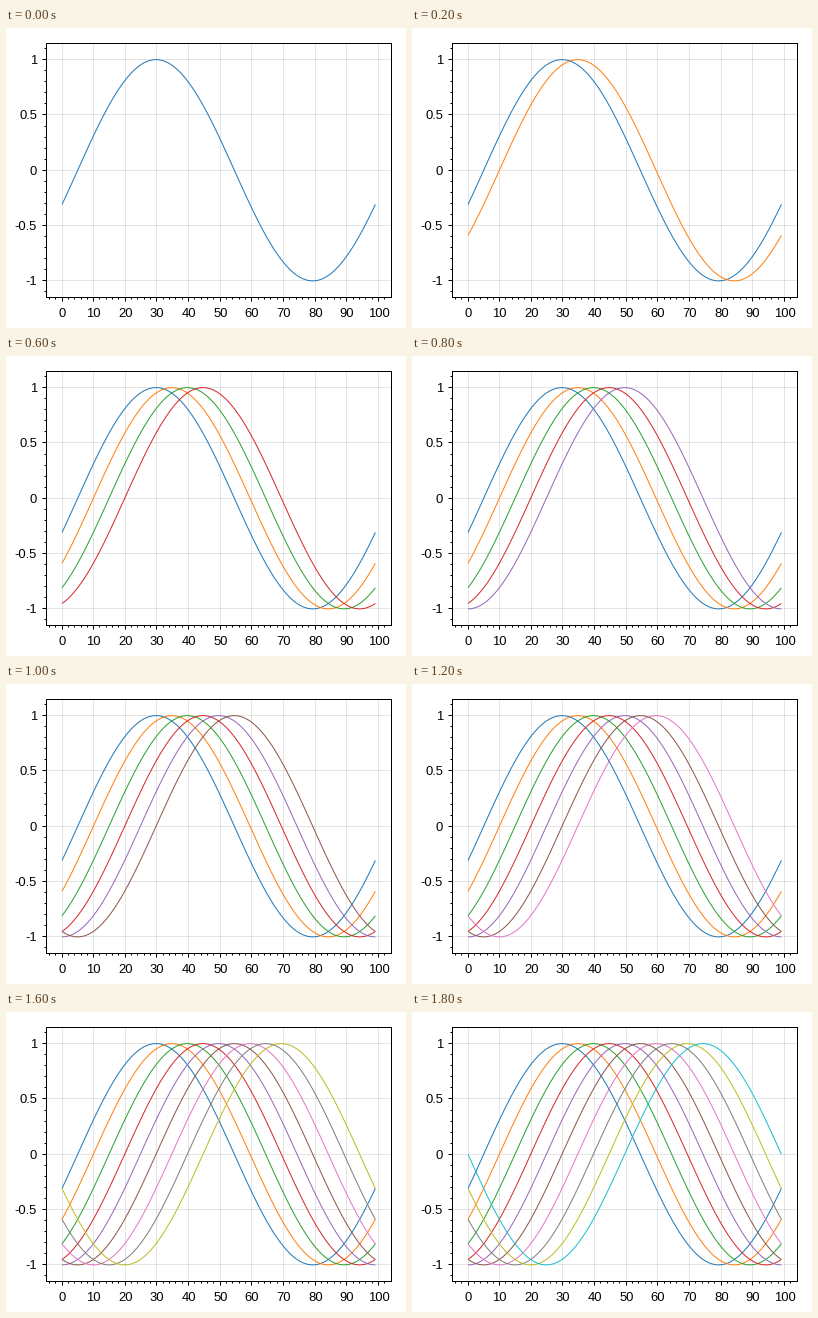
Animation, 400 px wide and 300 px high, one loop 2 s. Source, as a matplotlib script:

```python
import numpy as np
import matplotlib.pyplot as plt
from matplotlib.animation import FuncAnimation
from matplotlib.ticker import MultipleLocator
from matplotlib.transforms import ScaledTranslation

W, H, DPI = 400, 300, 100
LEFT, TOP, RIGHT, BOTTOM = 40.35, 15.02, 385.02, 269.5
XMIN, XMAX, YMIN, YMAX = -4.95, 103.95, -1.15, 1.15
CURVES, POINTS = 10, 100
STEP_MS = 200
HALF = 0.5


def px(n):
    """Pixels to points."""
    return n * 72 / DPI


plt.rcParams["font.family"] = "Liberation Sans"
plt.rcParams["font.size"] = px(13)

# Axes sit half a pixel up and left, so snapped lines round down to whole pixels.
fig = plt.figure(figsize=(W / DPI, H / DPI), dpi=DPI, facecolor="white")
ax = fig.add_axes([(LEFT - HALF) / W, 1 - (BOTTOM - HALF) / H,
                   (RIGHT - LEFT) / W, (BOTTOM - TOP) / H])
ax.set_xlim(XMIN, XMAX)
ax.set_ylim(YMIN, YMAX)

for spine in ax.spines.values():
    spine.set_linewidth(px(1))

ax.set_axisbelow(True)
ax.grid(color="black", alpha=0.1, linewidth=px(1))
ax.xaxis.set_major_locator(MultipleLocator(10))
ax.xaxis.set_minor_locator(MultipleLocator(2))
ax.yaxis.set_major_locator(MultipleLocator(0.5))
ax.yaxis.set_minor_locator(MultipleLocator(0.1))
ax.tick_params(which="major", length=px(4), width=px(1))
ax.tick_params(which="minor", length=px(2), width=px(1))
ax.tick_params(labelbottom=False, labelleft=False)


def label(value, x, y, align):
    fig.text(x / W, 1 - y / H, f"{value:g}", ha=align, va="baseline")


for v in range(0, 101, 10):
    x = LEFT + (v - XMIN) / (XMAX - XMIN) * (RIGHT - LEFT)
    label(v, x, 289, "center")
for v in (-1, -0.5, 0, 0.5, 1):
    y = TOP + (YMAX - v) / (YMAX - YMIN) * (BOTTOM - TOP)
    label(v, 31, round(y + 4.3), "right")

# Curves are not snapped, so they take the half pixel back.
unshift = ScaledTranslation(HALF / DPI, -HALF / DPI, fig.dpi_scale_trans)
xs = np.arange(POINTS)
lines = []
for k in range(CURVES):
    ys = np.sin(2 * np.pi * (xs / (POINTS - 1) - 0.05 * (k + 1)))
    lines += ax.plot(xs, ys, color=f"C{k}", linewidth=px(1),
                     solid_capstyle="butt", transform=ax.transData + unshift)


def draw(frame):
    for k, line in enumerate(lines):
        line.set_visible(k <= frame)
    return lines


anim = FuncAnimation(fig, draw, frames=CURVES, interval=STEP_MS,
                     repeat=True, repeat_delay=0)
plt.show()
```
